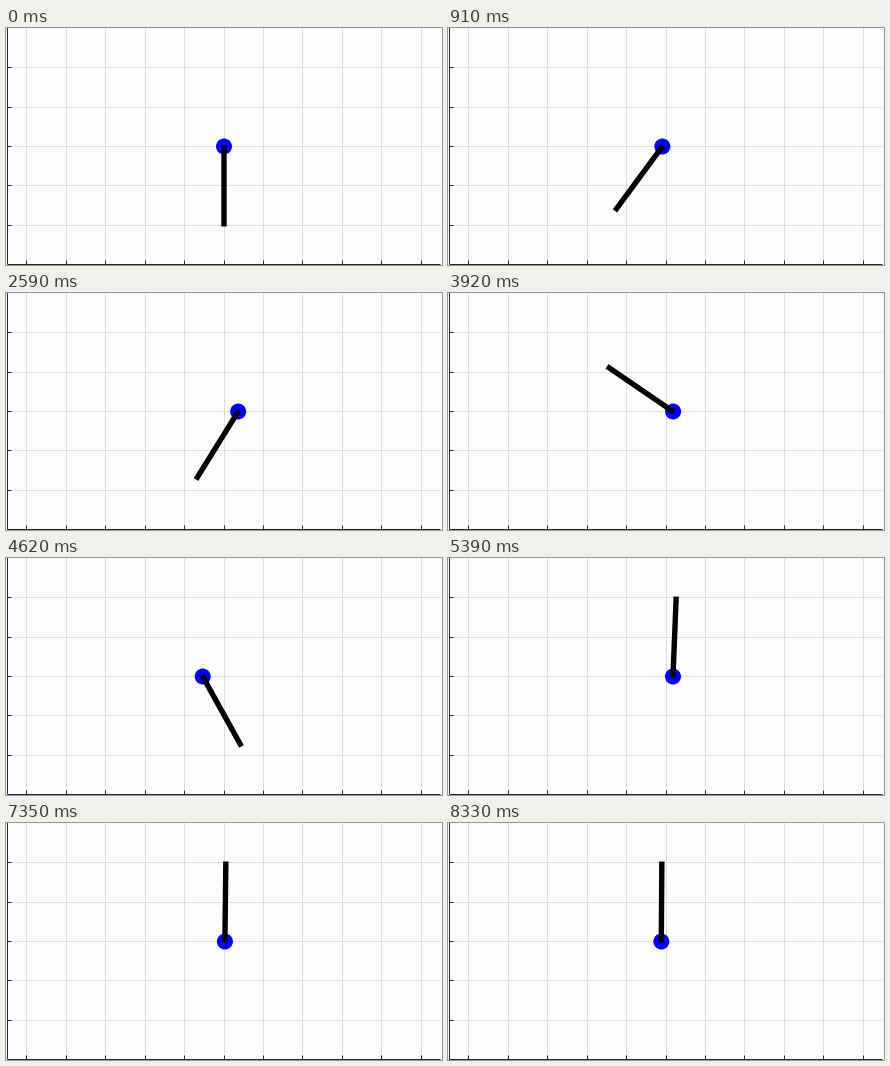
Recreate the animation shown at these times as a matplotlib script. Size 436x237 px, loop 8400 ms.

```python
import numpy as np
import matplotlib.pyplot as plt
from matplotlib.animation import FuncAnimation
from matplotlib.patches import Circle

W, H, DPI = 436, 237, 100
FRAMES, STEP = 120, 70
PIVOT_Y, POLE, RADIUS = 118.5, 80, 8
PX = 72 / DPI  # points per pixel


def glide(k, *turns):
    """Cosine ease between turning points (time, value, skew).

    A skew above 1 makes the way to that point start fast and end slowly.
    """
    out = np.full(len(k), float(turns[0][1]))
    for (t0, v0, _), (t1, v1, skew) in zip(turns, turns[1:]):
        u = np.clip((k - t0) / (t1 - t0), 0, 1)
        u = 1 - (1 - u) ** skew
        out += (v1 - v0) * (1 - np.cos(np.pi * u)) / 2
    return out


k = np.arange(FRAMES)

# Degrees from hanging down: growing swings, swing-up, settling upright
theta = np.radians(glide(
    k, (0, 0, 1), (4, 8, 1), (12.5, -37, 1), (22.6, 65.5, 1), (33, -85, 1),
    (44.4, 109, 1), (57.6, -133, 1), (84, 183.4, 1.85), (107, 179.3, 1.5),
    (119, 179.6, 1)))

# Cart position in pixels
cart_x = glide(
    k, (0, 218, 1), (8.2, 199.5, 1), (17.4, 227.3, 1), (28.2, 194, 1.4),
    (39.6, 237.5, 1), (50.5, 202.5, 2.2), (56.8, 226, 1), (67.3, 196.5, 1.4),
    (85, 246, 1), (118, 213.3, 1.4))

fig = plt.figure(figsize=(W / DPI, H / DPI), dpi=DPI, facecolor="#fdfdfd")
ax = fig.add_axes([0, 0, 1, 1])
ax.set(xlim=(0, W), ylim=(H, 0))
ax.axis("off")


def rule(x, y, color="black", width=1, z=1):
    return ax.plot(x, y, color=color, lw=width * PX, zorder=z, snap=False,
                   solid_capstyle="butt")[0]


GRID, AXIS = "#dedede", "#262626"
LEFT, RIGHT, BOTTOM, TICK = 1.5, 434.5, 236.5, 4
for gx in np.floor(20.9 + 39.42 * np.arange(11)) + 0.5:
    rule([gx, gx], [0, BOTTOM], GRID)
    rule([gx, gx], [BOTTOM - TICK, BOTTOM], AXIS, z=2)
for gy in np.round(39.4 + 39.35 * np.arange(5)) + 0.5:
    rule([LEFT, RIGHT], [gy, gy], GRID)
    rule([LEFT, LEFT + TICK], [gy, gy], AXIS, z=2)
rule([LEFT, LEFT], [0, BOTTOM], AXIS, z=2)
rule([LEFT, RIGHT], [BOTTOM, BOTTOM], AXIS, z=2)

cart = ax.add_patch(Circle((cart_x[0], PIVOT_Y), RADIUS, fc="#0000ff",
                           ec="none", zorder=3))
pole = rule([], [], width=5.4, z=4)


def draw(i):
    cart.center = cart_x[i], PIVOT_Y
    reach = np.array([-1, POLE])  # the pole pokes out a little past the pivot
    pole.set_data(cart_x[i] + reach * np.sin(theta[i]),
                  PIVOT_Y + reach * np.cos(theta[i]))
    return cart, pole


anim = FuncAnimation(fig, draw, frames=FRAMES, interval=STEP,
                     repeat=True, repeat_delay=0)
plt.show()
```
